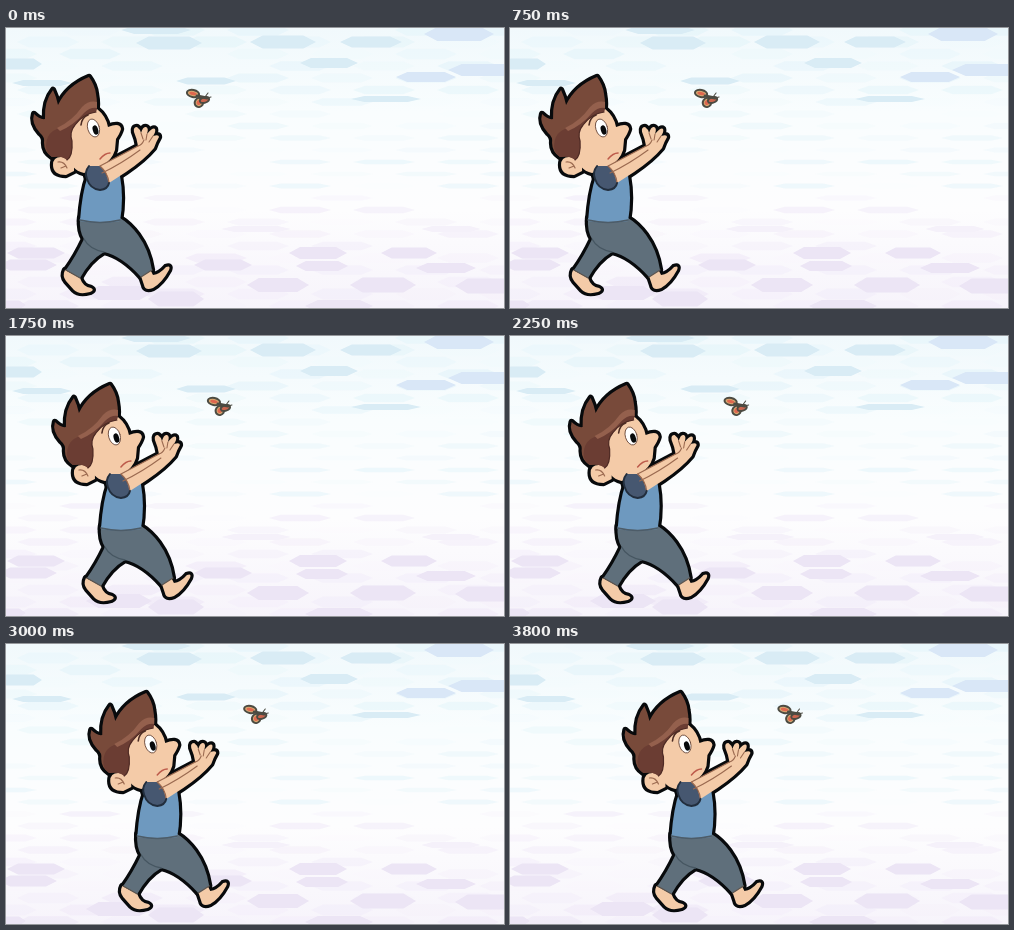
Recreate the animation shown at these times as an HTML page with a canvas. Size 498 px wide and 280 px high, loop 3.85 s.

```html
<!DOCTYPE html>
<html lang="en">
<head>
<meta charset="utf-8">
<title>Butterfly walk</title>
<style>
  html, body { margin: 0; width: 100%; height: 100%; overflow: hidden; background: #fbfdfe; }
  canvas { display: block; width: 498px; height: 280px; }
</style>
</head>
<body>
<canvas id="stage" width="498" height="280"></canvas>
<script>
const W = 498, H = 280, LOOP = 3850, STEP = 50;
const ctx = document.getElementById('stage').getContext('2d');
const INK = '#080a0c', SKIN = '#f4cba8', LINE = '#9b6a50';

// Background: flattened hexagons, cool above and lilac below
function hexagon(g, x, y, w, h, color) {
  g.fillStyle = color;
  g.beginPath();
  g.moveTo(x - w / 2, y);
  g.lineTo(x - w * .31, y - h / 2);
  g.lineTo(x + w * .31, y - h / 2);
  g.lineTo(x + w / 2, y);
  g.lineTo(x + w * .31, y + h / 2);
  g.lineTo(x - w * .31, y + h / 2);
  g.fill();
}

const coolTiles = [
  [163, 15, 66, 13], [277, 14, 66, 13], [453, 6, 70, 14], [323, 35, 58, 10],
  [420, 49, 60, 10], [478, 42, 72, 12], [14, 36, 44, 11], [150, 2, 70, 8],
  [200, 53, 60, 7], [36, 55, 60, 6], [365, 14, 62, 11], [380, 71, 70, 6]
];
const lilacTiles = [
  [30, 225, 58, 11], [312, 225, 58, 12], [403, 225, 56, 11], [377, 257, 66, 15],
  [482, 258, 66, 15], [272, 257, 62, 14], [217, 237, 58, 11], [113, 265, 66, 14],
  [170, 271, 56, 15], [22, 237, 58, 11], [333, 278, 68, 12], [2, 277, 36, 9],
  [316, 238, 52, 10], [440, 240, 60, 10], [250, 201, 70, 6], [445, 201, 60, 6]
];

function makeBackground() {
  const layer = document.createElement('canvas');
  layer.width = W;
  layer.height = H;
  const g = layer.getContext('2d');
  const wash = g.createLinearGradient(0, 0, 0, H);
  wash.addColorStop(0, '#f1f9fc');
  wash.addColorStop(.3, '#f9fdfe');
  wash.addColorStop(.65, '#fdfdfe');
  wash.addColorStop(1, '#f7f4fb');
  g.fillStyle = wash;
  g.fillRect(0, 0, W, H);

  let seed = 17;
  const random = () => (seed = seed * 16807 % 2147483647) / 2147483647;
  for (let row = 0; row < 24; row++) {
    const y = row * 12 + 2;
    const h = 4 + Math.abs(y - 140) / 18;
    for (let x = row % 2 * 42; x < W + 40; x += 84) {
      const tint = y < 160 ? '205,234,244' : '226,213,240';
      hexagon(g, x, y, 62, h, `rgba(${tint},${random() * .3})`);
    }
  }
  coolTiles.forEach(t => hexagon(g, ...t, t[0] > 400 ? '#d9e7f7' : '#d9ecf5'));
  lilacTiles.forEach(t => hexagon(g, ...t, t[1] < 210 ? '#f5f1fa' : '#ece5f5'));
  return layer;
}

const part = (color, d) => ({ color, path: new Path2D(d) });

const body = [
  part(SKIN, 'M59 242 Q56 248 60 253 L68 262 Q73 267 84 264 Q89 262 85 260 Q77 259 74 250 Z'),
  part(SKIN, 'M134 245 L138 257 Q139 263 147 260 Q156 255 163 242 Q165 237 160 239 Q154 246 147 247 L144 241 Z'),
  part('#5f6f7b', 'M74 190 Q73 203 78 211 Q70 228 60 242 L74 250 Q84 232 98 224 Q116 228 135 249 L146 242 Q143 222 132 207 Q124 196 114 190 Z'),
  part('#6e99bf', 'M82 148 Q76 164 74 193 Q94 197 114 193 Q118 170 114 148 Z'),
  part(SKIN, 'M55 129 Q47 129 47 137 Q47 147 60 147 L68 143 L68 128 Z'),
  part(SKIN, 'M66 94 L91 81 Q100 88 102 99 Q114 94 115 101 Q114 105 110 111 L109 122 Q106 132 96 138 L78 145 Q64 142 62 125 Z'),
  part('#784a3a', 'M46 129 Q38 124 38 115 Q39 109 34 105 Q25 95 28 86 Q34 92 39 91 Q38 73 47 62 Q50 68 52 77 Q61 58 83 49 Q89 57 90 66 Q92 77 90 84 Q77 86 69 97 Q63 104 66 113 Q67 128 61 132 Q56 127 46 129 Z'),
  part('#465770', 'M83 138 Q78 144 81 151 Q84 161 94 162 Q102 161 103 155 Q100 143 94 138 Z'),
  part(SKIN, 'M94 138 L132 118 Q131 111 128 104 Q127 99 131 99 Q134 101 135 105 Q137 98 140 99 Q143 100 141 106 Q147 99 149 101 Q150 104 147 108 Q153 106 153 109 Q150 114 148 120 Q138 132 120 144 L103 155 Q102 145 94 138 Z')
];

const hairDark = new Path2D('M40 118 Q40 108 47 103 Q64 95 77 80 Q85 76 91 80 L90 84 Q77 86 69 97 Q63 104 66 113 Q67 128 61 132 Q56 127 46 129 Q40 125 40 118 Z');
const hairLight = new Path2D('M51 100 Q66 93 76 79 Q83 72 91 74 L91 80 Q84 79 78 85 Q68 97 54 103 Z');

function line(d, color, width) {
  ctx.strokeStyle = color;
  ctx.lineWidth = width;
  ctx.stroke(new Path2D(d));
}

function oval(x, y, rx, ry, angle, fill, stroke, width = 1) {
  ctx.beginPath();
  ctx.ellipse(x, y, rx, ry, angle, 0, Math.PI * 2);
  ctx.fillStyle = fill;
  ctx.fill();
  if (!stroke) return;
  ctx.strokeStyle = stroke;
  ctx.lineWidth = width;
  ctx.stroke();
}

function drawBoy() {
  ctx.strokeStyle = INK;
  ctx.lineWidth = 6.4;
  body.forEach(p => ctx.stroke(p.path));
  body.forEach(p => {
    ctx.fillStyle = p.color;
    ctx.fill(p.path);
  });

  ctx.fillStyle = '#6b3d33';
  ctx.fill(hairDark);
  ctx.fillStyle = '#94604d';
  ctx.fill(hairLight);
  line('M90 84 Q77 86 69 97 Q63 104 66 113 Q67 128 61 132', '#4e2a24', 1.2);

  oval(87.5, 100, 5.8, 9.2, -.3, '#ffffff', '#654234', .9);
  oval(89.5, 102, 2.7, 4.8, -.3, INK);
  line('M75 97 Q76 89 82 87', '#4b2b23', 1.6);
  line('M94 131 Q99 125 104 125', '#bd5b4b', 1.5);
  line('M52 134 Q58 133 61 140 M55 140 L60 138', LINE, 1.2);

  line('M94 138 L132 118 M103 155 Q102 145 94 138', LINE, 1.3);
  line('M96 145 Q115 136 134 122 M132 118 Q136 117 138 112 M135 105 L137 111 M141 106 L140 112 M147 108 L143 114', LINE, 1.1);
  line('M83 138 Q78 144 81 151 Q84 161 94 162 Q102 161 103 155', '#222e3d', 1.9);
  line('M74 192 Q94 197 114 192', '#4d5c68', 1.5);
  line('M78 211 Q83 221 98 224', '#465661', 1.3);
  line('M60 242 L74 250 M135 249 L146 242', '#5c5550', 1.2);
}

function drawButterfly() {
  const edge = '#4c4b42';
  oval(187, 65.5, 6.2, 3.6, .2, '#d5a870', edge, 2);
  oval(187, 65.5, 3.7, 1.6, .2, '#df674f');
  oval(193, 74.5, 4.2, 4.6, .55, '#d5a870', edge, 2);
  oval(193, 74.5, 2.2, 2.6, .55, '#df674f');
  oval(198.5, 72, 4.8, 2.7, -.3, '#ca654e', edge, 1.8);
  line('M191 68 L201 70', edge, 3);
  line('M199 69 L202 65 M201 70 L205 69', edge, 1.1);
}

const background = makeBackground();
ctx.lineJoin = ctx.lineCap = 'round';

function render(now) {
  const t = Math.floor(now % LOOP / STEP) * STEP / 1000;
  const shift = t * t * (7.5 - .38 * t);
  ctx.drawImage(background, 0, 0);
  ctx.save();
  ctx.translate(shift, 0);
  drawBoy();
  drawButterfly();
  ctx.restore();
}

let start;
function tick(now) {
  start ??= now;
  render(now - start);
  requestAnimationFrame(tick);
}
render(0);
requestAnimationFrame(tick);
</script>
</body>
</html>
```
